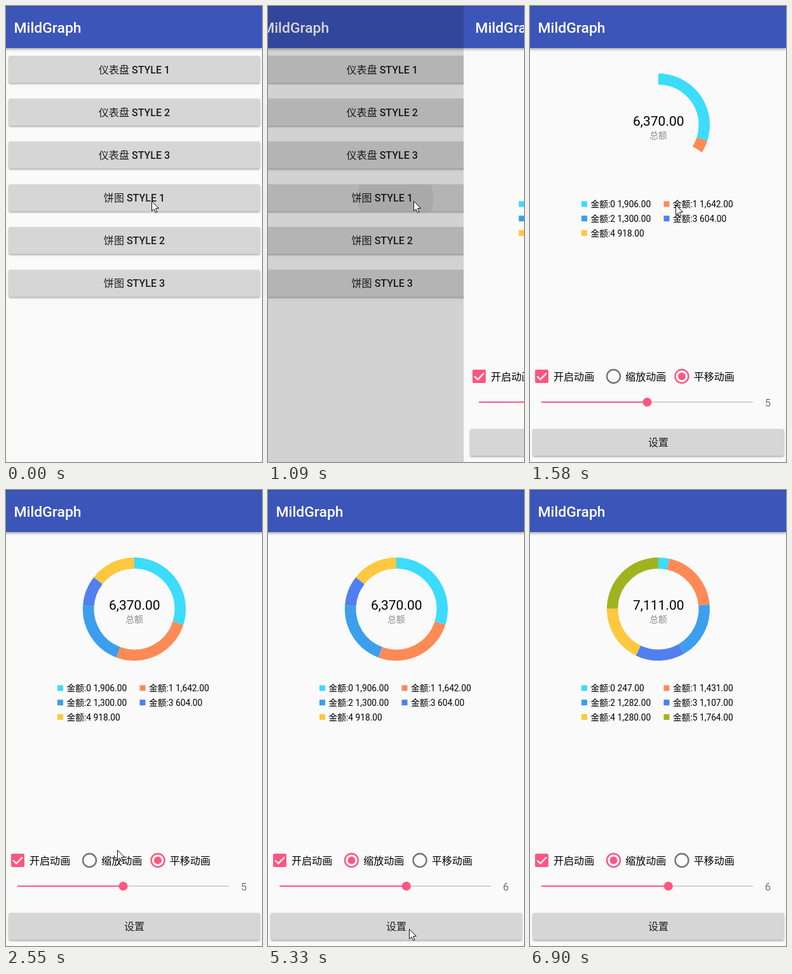
These frames come from a looping animation (403 by 716 pixels, 8 s). An HTML page with a canvas:

```html
<!DOCTYPE html>
<html lang="zh-CN">
<head>
<meta charset="utf-8">
<title>Chart demo</title>
<style>
html, body { margin: 0; width: 100%; height: 100%; overflow: hidden; background: #fafafa; }
canvas { display: block; }
</style>
</head>
<body>
<canvas id="stage" width="403" height="716"></canvas>
<script>
const W = 403, H = 716, LOOP = 8000, TAU = Math.PI * 2;
const ctx = document.getElementById('stage').getContext('2d');
const FAMILY = 'Roboto, "Noto Sans CJK SC", "Noto Sans CJK", sans-serif';
const PINK = '#ff5681', GREY = '#757575', PAPER = '#fafafa';
const COLORS = ['#3bdcfc', '#ff8a55', '#3c9eed', '#527ff0', '#ffc83f', '#a0b31e'];
const FIRST = [1906, 1642, 1300, 604, 918];
const SECOND = [247, 1431, 1282, 1107, 1280, 1764];

// Pointer stops: time, x, y
const POINTER = [
  [0, 230, 306], [1400, 230, 306], [1570, 230, 312], [1900, 230, 312],
  [2550, 176, 565], [2730, 166, 574], [3090, 166, 574], [3490, 197, 685],
  [3900, 197, 685], [4180, 182, 617], [4300, 182, 617], [4680, 213, 617],
  [4920, 233, 660], [5140, 223, 689], [5650, 223, 689], [6060, 247, 684],
  [6260, 247, 684], [6850, 262, 718], [LOOP, 262, 718]
];

const clamp = v => Math.max(0, Math.min(1, v));
const span = (t, start, length) => clamp((t - start) / length);
const smooth = x => (1 - Math.cos(Math.PI * x)) / 2;
const money = n => n.toLocaleString('en-US', { minimumFractionDigits: 2 });
const total = values => values.reduce((a, b) => a + b, 0);

function text(str, x, y, size, color = '#000', align = 'left', weight = 400) {
  ctx.font = `${weight} ${size}px ${FAMILY}`;
  ctx.fillStyle = color;
  ctx.textAlign = align;
  ctx.fillText(str, x, y);
}

function rect(x, y, w, h, color) {
  ctx.fillStyle = color;
  ctx.fillRect(x, y, w, h);
}

function disc(x, y, r, color) {
  ctx.fillStyle = color;
  ctx.beginPath();
  ctx.arc(x, y, r, 0, TAU);
  ctx.fill();
}

function line(points, width, color) {
  ctx.strokeStyle = color;
  ctx.lineWidth = width;
  ctx.beginPath();
  points.forEach(([x, y]) => ctx.lineTo(x, y));
  ctx.stroke();
}

function withShadow(alpha, blur, offset, draw) {
  ctx.save();
  ctx.shadowColor = `rgba(0,0,0,${alpha})`;
  ctx.shadowBlur = blur;
  ctx.shadowOffsetY = offset;
  draw();
  ctx.restore();
}

function header() {
  withShadow(0.35, 4, 2, () => rect(-8, 0, W + 8, 66, '#3c55b8'));
  rect(-8, 0, W + 8, 1, '#2f419c');
  text('MildGraph', 12.5, 42, 22.9, '#fff', 'left', 500);
}

function button(y, ripple) {
  ctx.beginPath();
  ctx.roundRect(4.5, y, 395, 42.5, 2);
  ctx.fillStyle = '#d6d6d6';
  withShadow(0.35, 3, 1.5, () => ctx.fill());
  if (!ripple || ripple.alpha <= 0) return;
  ctx.save();
  ctx.clip();
  disc(ripple.x, ripple.y, ripple.r, `rgba(0,0,0,${ripple.alpha})`);
  ctx.restore();
}

function styleLabel(kind, number, baseline) {
  const prefix = kind + ' ', suffix = 'STYLE ' + number, size = 16.06;
  ctx.font = `400 ${size}px ${FAMILY}`;
  const left = ctx.measureText(prefix).width;
  ctx.font = `500 ${size}px ${FAMILY}`;
  const x = 202 - (left + ctx.measureText(suffix).width) / 2;
  text(prefix, x, baseline, size, '#1e1e1e');
  text(suffix, x + left, baseline, size, '#1e1e1e', 'left', 500);
}

function listPage(t) {
  rect(0, 0, W, H, PAPER);
  header();
  for (let i = 0; i < 6; i++) {
    const ripple = i === 3 && t > 910 && { x: 223, y: 301, r: (t - 910) * 0.33, alpha: 0.06 };
    button(78.3 + 67.2 * i, ripple);
    styleLabel(i < 3 ? '仪表盘' : '饼图', i % 3 + 1, 105.8 + 67.05 * i);
  }
}

function ring(values, progress, scaled) {
  const unit = TAU / total(values);
  const limit = scaled ? TAU : TAU * progress;
  let from = 0;
  ctx.lineWidth = 17.5;
  values.forEach((value, i) => {
    const to = from + value * unit * (scaled ? progress : 1);
    const end = Math.min(to, limit);
    if (end > from) {
      ctx.strokeStyle = COLORS[i];
      ctx.beginPath();
      ctx.arc(202, 187, 72.3, from - TAU / 4, end - TAU / 4);
      ctx.stroke();
    }
    from = to;
  });
}

function chart(values, progress, scaled) {
  ring(values, progress, scaled);
  text(money(total(values)), 202.3, 187.5, 21, '#000', 'center');
  text('总额', 202, 208.3, 13.76, '#8c8c8c', 'center');
  values.forEach((value, i) => {
    const x = 81 + i % 2 * 129.5, y = 306.5 + Math.floor(i / 2) * 22.7;
    rect(x, y, 9, 9, COLORS[i]);
    text(`金额:${i} ${money(value)}`, x + 14.5, y + 9.8, 13.76);
  });
}

function radio(x, label, on) {
  ctx.strokeStyle = on ? PINK : GREY;
  ctx.lineWidth = 2.4;
  ctx.beginPath();
  ctx.arc(x, 581.5, 10.5, 0, TAU);
  ctx.stroke();
  if (on) disc(x, 581.5, 5.9, PINK);
  text(label, x + 18.7, 587.5, 16.06);
}

function controls(t) {
  ctx.beginPath();
  ctx.roundRect(8, 571, 21, 21, 2);
  ctx.fillStyle = PINK;
  ctx.fill();
  line([[11.3, 581.5], [16.3, 586.5], [26, 576.5]], 2.4, '#fff');
  text('开启动画', 37, 587.5, 16.06);

  const zoom = t >= 3050;
  const tap = span(t, 3030, 400);
  if (tap > 0 && tap < 1) disc(131.5, 581.5, 8 + 12 * tap, `rgba(255,86,129,${0.25 * (1 - tap)})`);
  radio(131.5, '缩放动画', zoom);
  radio(239, '平移动画', !zoom);

  const value = t < 4480 ? 5 : 6;
  const thumb = 18 + 33.3 * value;
  const held = t > 4240 && t < 4690;
  line([[18, 622], [351, 622]], 2.2, '#d2d2d2');
  line([[18, 622], [thumb, 622]], 2.2, PINK);
  disc(thumb, 622, held ? 10 : 7, PINK);
  text(value, 369.7, 629, 16.5, GREY);

  const press = span(t, 5335, 700);
  button(664, t > 5335 && { x: 223, y: 689, r: 15 + 330 * press, alpha: 0.07 * (1 - press) });
  text('设置', 202, 690.8, 16.06, '#1e1e1e', 'center');
}

function chartPage(t) {
  rect(-6, 0, W + 6, H, PAPER);
  header();
  if (t < 5360) chart(FIRST, smooth(span(t, 980, 1520)), false);
  else chart(SECOND, smooth(span(t, 5340, 1430)), true);
  controls(t);
}

function pointer(t) {
  const i = POINTER.findIndex(stop => stop[0] > t);
  const [t0, x0, y0] = POINTER[i - 1], [t1, x1, y1] = POINTER[i];
  const k = smooth((t - t0) / (t1 - t0));
  ctx.save();
  ctx.translate(Math.round(x0 + (x1 - x0) * k) - 0.5, Math.round(y0 + (y1 - y0) * k) + 0.5);
  ctx.beginPath();
  [[0, 0], [0, 15.5], [3.5, 12.3], [6, 18], [8.5, 17], [6, 11.3], [11, 11]]
    .forEach(([x, y]) => ctx.lineTo(x, y));
  ctx.closePath();
  ctx.fillStyle = '#fff';
  ctx.fill();
  ctx.strokeStyle = '#111';
  ctx.lineWidth = 1;
  ctx.stroke();
  ctx.restore();
}

function render(t) {
  const x = span(t, 1044, 400);
  const slide = 1 - (1 - x) ** 2;
  if (slide < 1) {
    ctx.save();
    ctx.translate(-0.25 * W * slide, 0);
    listPage(t);
    ctx.restore();
    rect(0, 0, W, H, `rgba(0,0,0,${0.4 * slide ** 0.6})`);
  }
  if (slide > 0) {
    ctx.save();
    ctx.translate(W * (1 - slide), 0);
    ctx.beginPath();
    ctx.rect(-6, 0, W + 6, H);
    ctx.clip();
    chartPage(t);
    ctx.restore();
  }
  pointer(t);
}

const begin = performance.now();
function frame() {
  render((performance.now() - begin) % LOOP);
  requestAnimationFrame(frame);
}
frame();
</script>
</body>
</html>
```
